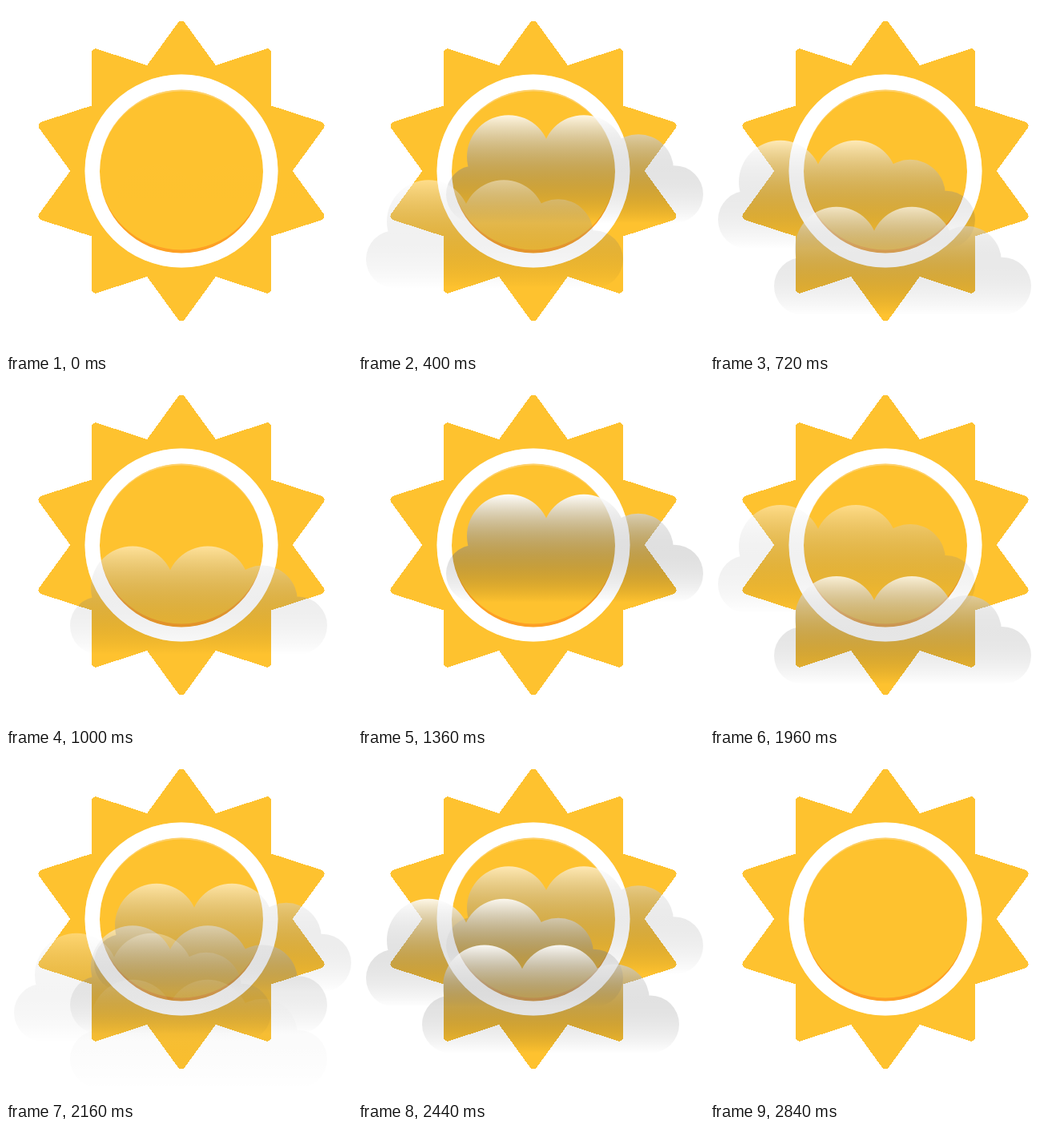
Animation, 432 px wide and 432 px high, one loop 2.88 s. Source, as an HTML page:

```html
<!DOCTYPE html>
<html lang="en">
<head>
<meta charset="utf-8">
<title>Sun and clouds</title>
<style>
html, body { margin: 0; width: 100%; height: 100%; overflow: hidden; background: #fff; }
svg { display: block; width: 100%; height: 100%; }
</style>
</head>
<body>
<svg viewBox="0 0 432 432">
  <defs>
    <linearGradient id="mist" gradientUnits="userSpaceOnUse" x1="0" y1="0" x2="0" y2="135">
      <stop offset="0" stop-color="#fff"/>
      <stop offset="1" stop-color="#000" stop-opacity="0"/>
    </linearGradient>
    <polygon id="rays" stroke-width="10" stroke-linejoin="round" shape-rendering="crispEdges"/>
    <circle id="ring" cx="219" cy="206" r="120.5"/>
    <circle id="disk" cx="219" cy="206.5" r="102"/>
    <mask id="offSun" maskUnits="userSpaceOnUse" x="0" y="0" width="432" height="432">
      <rect width="432" height="432" fill="#fff"/>
      <use href="#rays" fill="#000" stroke="#000"/>
      <use href="#ring" fill="#fff"/>
      <use href="#disk" fill="#000"/>
    </mask>
  </defs>
  <use href="#rays" fill="#fec22f" stroke="#fec22f"/>
  <use href="#ring" fill="#fff"/>
  <use href="#disk" fill="#fec22f"/>
  <path d="M117 206.5A102 102 0 0 0 321 206.5A102 98 0 0 1 117 206.5z" fill="#fd9f24"/>
  <path d="M117 206.5A102 102 0 0 1 321 206.5A102 100 0 0 0 117 206.5z" fill="#fed16c"/>
  <g id="sky"></g>
  <!-- Clouds look paler away from the yellow -->
  <rect width="432" height="432" fill="#fff" opacity="0.5" mask="url(#offSun)"/>
</svg>
<script>
const LOOP = 2880;
const CENTER = { x: 219, y: 206 };

const points = [];
for (let i = 0; i < 20; i++) {
  const a = (i * 18 - 90) * Math.PI / 180;
  const r = i % 2 ? 132.5 : 182.5;
  points.push(`${CENTER.x + r * Math.cos(a)},${CENTER.y + r * Math.sin(a)}`);
}
document.getElementById('rays').setAttribute('points', points.join(' '));

const puff = (cx, cy, r) =>
  `M${cx - r} ${cy}a${r} ${r} 0 1 1 ${2 * r} 0a${r} ${r} 0 1 1 ${-2 * r} 0z`;

const cloudShape = [
  puff(36, 99, 36), puff(78, 52, 52), puff(172, 52, 52),
  puff(240, 68, 44), puff(285, 99, 36),
  'M60 60H260V99H285V135H36V99H60z'
].join('');

const left = { x: 10, y: 241 };
const low = { x: 80, y: 288 };
const right = { x: 110, y: 198 };

// Each cloud rises while it fades in and out
const DURATION = 700;
const rise = (from, start, travel = 108) => ({ ...from, start, travel });
const clouds = [
  rise(right, 0), rise(left, 247), rise(low, 480),
  rise(right, 1003), rise(left, 1410), rise(low, 1683),
  rise({ x: 110, y: 177 }, 1964, 54), rise(left, 2050), rise(low, 2120)
];

const sky = document.getElementById('sky');
for (const c of clouds) {
  c.el = document.createElementNS('http://www.w3.org/2000/svg', 'path');
  c.el.setAttribute('d', cloudShape);
  c.el.setAttribute('fill', 'url(#mist)');
  sky.appendChild(c.el);
}

function draw(time) {
  for (const c of clouds) {
    const p = (time - c.start) / DURATION;
    const shown = p > 0 && p < 1;
    c.el.setAttribute('display', shown ? 'inline' : 'none');
    if (!shown) continue;
    c.el.setAttribute('transform', `translate(${c.x} ${c.y - c.travel * p})`);
    c.el.setAttribute('opacity', 1 - Math.abs(2 * p - 1));
  }
}

const begin = performance.now();
function tick() {
  draw((performance.now() - begin) % LOOP);
  requestAnimationFrame(tick);
}
draw(0);
requestAnimationFrame(tick);
</script>
</body>
</html>
```
